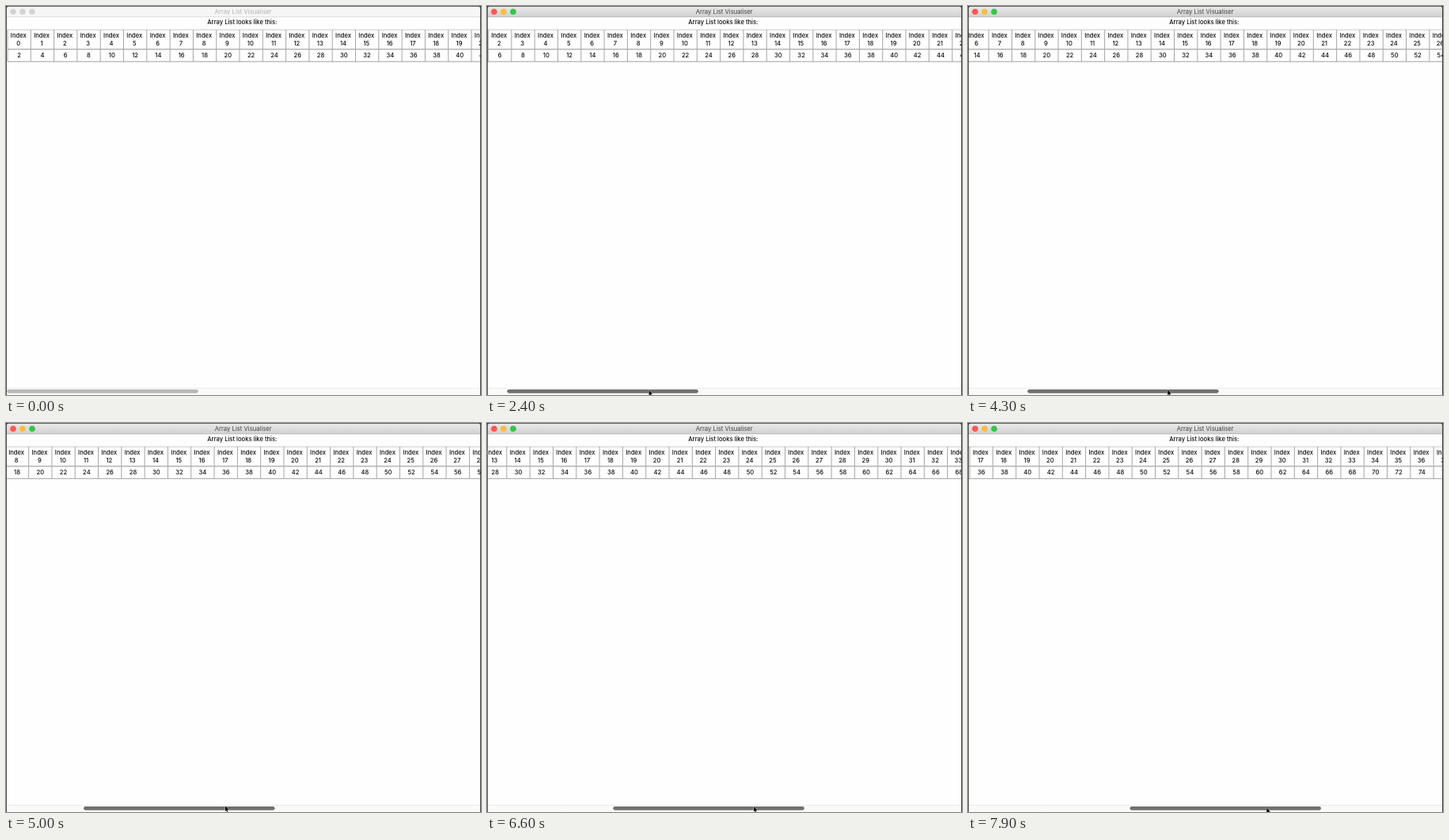
An HTML page for the animation above (8000 ms loop, 600 px wide and 492 px high).

```html
<!DOCTYPE html>
<html lang="en">
<head>
<meta charset="utf-8">
<title>Array List Visualiser</title>
<style>
  html, body { margin: 0; width: 100%; height: 100%; overflow: hidden; background: #fff; }
  svg { display: block; width: 600px; height: 492px; }
  text { font: 500 7.6px Inter, "Open Sans", sans-serif; fill: #0c0c0c; text-anchor: middle; }
  #title { font-weight: 400; font-size: 7.7px; }
</style>
</head>
<body>
<svg viewBox="0 0 600 492">
  <defs>
    <linearGradient id="bar" x1="0" y1="0" x2="0" y2="1">
      <stop offset="0" stop-color="#ebebeb"/>
      <stop offset="1" stop-color="#d0d0d0"/>
    </linearGradient>
    <clipPath id="view"><rect x="1" y="28" width="598" height="46"/></clipPath>
  </defs>
  <rect width="600" height="492" fill="#fefefe"/>
  <rect id="head" width="600" height="14"/>
  <rect id="rule" y="13.4" width="600" height=".8"/>
  <g id="lights"></g>
  <text id="title" x="299.7" y="9.8">Array List Visualiser</text>
  <text x="298.3" y="23.1">Array List looks like this:</text>
  <g clip-path="url(#view)"><g id="cells"></g></g>
  <rect y="483" width="600" height="9" fill="#fafafa"/>
  <rect y="483" width="600" height=".8" fill="#e6e6e6"/>
  <rect id="thumb" y="484.9" width="241.5" height="4.8" rx="2.4"/>
  <path d="M0 0H600V492H599V3Q599 .8 597 .8H3Q.9 .8 .9 3V492H0Z" fill="#3c3c3c"/>
  <path id="cursor" d="M0 0V6.7L1.5 5.3L2.5 7.6L3.6 7.1L2.6 4.9H4.7Z"
        fill="#000" stroke="#fff" stroke-width=".7" paint-order="stroke"/>
</svg>
<script>
const LOOP = 8000, STEP = 100, PITCH = 29.3, COUNT = 50, ACTIVE = 1100;
const $ = id => document.getElementById(id);

function add(parent, tag, attrs, label) {
  const el = document.createElementNS("http://www.w3.org/2000/svg", tag);
  for (const k in attrs) el.setAttribute(k, attrs[k]);
  if (label !== undefined) el.textContent = label;
  parent.appendChild(el);
  return el;
}

const lights = ["#fc5753", "#fdbc40", "#33c748"].map((color, i) =>
  ({ color, el: add($("lights"), "circle", { cx: 9 + i * 12, cy: 7.2, r: 3.8 }) }));

// Table of cells, each with an index row and a value row
const cells = $("cells"), width = PITCH * COUNT;
for (const [y, color] of [[29.6, "#c4c4c4"], [54.1, "#a4a4a4"], [55.2, "#dedede"], [69.8, "#999"]])
  add(cells, "rect", { x: 2, y, width, height: .9, fill: color });
for (let i = 0; i <= COUNT; i++) {
  const x = 2 + i * PITCH;
  add(cells, "rect", { x: x - .5, y: 30, width: 1, height: 24.6, fill: "#a6a6a6" });
  add(cells, "rect", { x: x - .5, y: 55.4, width: 1, height: 14.8, fill: "#a6a6a6" });
  if (i === COUNT) break;
  add(cells, "text", { x: x + 13.8, y: 39.9 }, "Index");
  add(cells, "text", { x: x + 13.8, y: 49.7 }, i);
  add(cells, "text", { x: x + 14.6, y: 65.1 }, i * 2 + 2);
}

// time, value
const scroll = [[1300, 0], [1500, 2.6], [3300, 117.6], [4300, 181], [5600, 289.5], [6600, 387.3], [7900, 498]];
const cursorX = [[600, 176.5], [800, 180.5], [1300, 180.5], [1500, 180.9], [3300, 228.2],
                 [4300, 252.2], [5600, 298], [6600, 337], [7900, 377.2]];
const cursorY = [[600, 489.5], [800, 485.8], [1500, 486], [3300, 485.8], [4300, 485.6],
                 [5600, 483.5], [6600, 485], [7900, 486.8]];

function slope(keys, i) {
  const a = keys[Math.max(i - 1, 0)], b = keys[Math.min(i + 1, keys.length - 1)];
  return (b[1] - a[1]) / (b[0] - a[0]);
}

function linear(keys, t) {
  if (t <= keys[0][0]) return keys[0][1];
  const i = keys.findIndex(k => k[0] >= t);
  if (i < 0) return keys[keys.length - 1][1];
  const [t0, a] = keys[i - 1], [t1, b] = keys[i];
  return a + (b - a) * (t - t0) / (t1 - t0);
}

// Cubic curve through the keys
function smooth(keys, t) {
  const i = keys.findIndex(k => k[0] >= t);
  if (i < 1) return linear(keys, t);
  const [t0, a] = keys[i - 1], [t1, b] = keys[i], d = t1 - t0, u = (t - t0) / d, v = 1 - u;
  return a * v * v * (1 + 2 * u) + b * u * u * (3 - 2 * u) +
         d * u * v * (v * slope(keys, i - 1) - u * slope(keys, i));
}

function draw(t) {
  const on = t >= ACTIVE, s = smooth(scroll, t);
  const x = linear(cursorX, t), y = linear(cursorY, t);
  $("head").setAttribute("fill", on ? "url(#bar)" : "#f6f6f6");
  $("rule").setAttribute("fill", on ? "#b4b4b4" : "#d6d6d6");
  $("title").style.fill = on ? "#444" : "#b2b2b2";
  for (const { el, color } of lights) el.setAttribute("fill", on ? color : "#d4d4d4");
  cells.setAttribute("transform", `translate(${-s} 0)`);
  $("thumb").setAttribute("x", 1.3 + s * .408);
  $("thumb").setAttribute("fill", on && y > 484.2 ? "#707070" : "#b9b9b9");
  $("cursor").setAttribute("transform", `translate(${x} ${y})`);
  $("cursor").setAttribute("visibility", t < 600 ? "hidden" : "visible");
}

function tick() {
  draw(Math.floor(performance.now() % LOOP / STEP) * STEP);
  requestAnimationFrame(tick);
}
tick();
</script>
</body>
</html>
```
